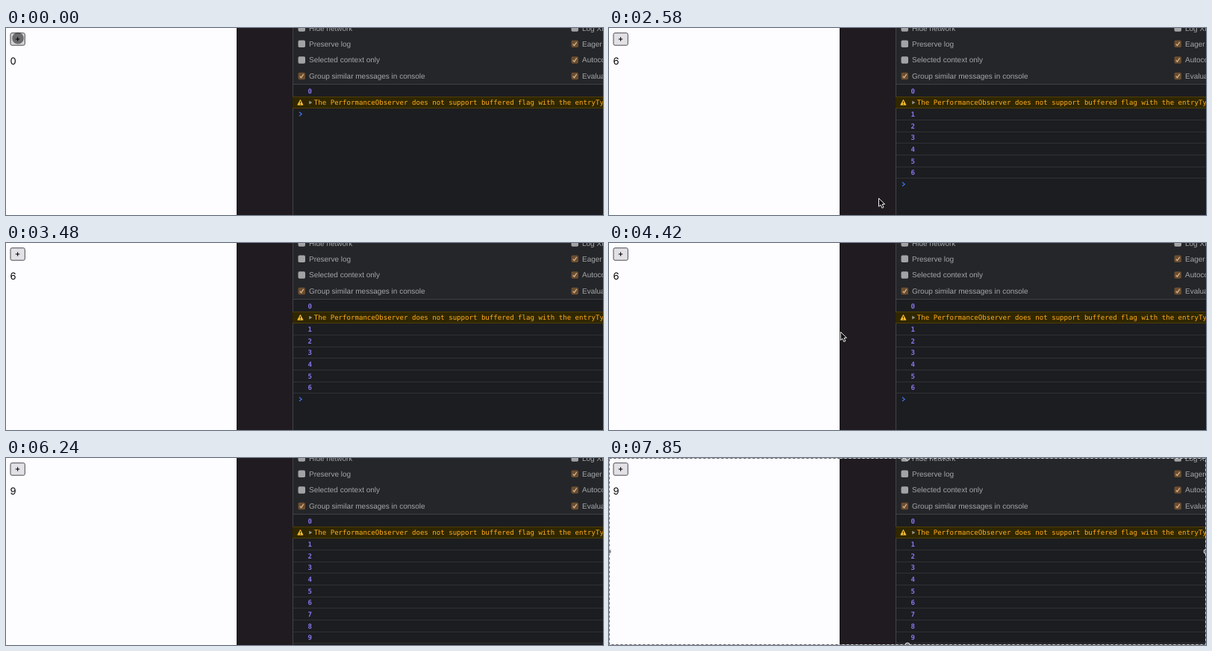
Animation, 800 px wide and 251 px high, one loop 7880 ms. Source, as an HTML page with a canvas:

```html
<!DOCTYPE html>
<html lang="en">
<head>
<meta charset="utf-8">
<style>
  html, body { margin: 0; overflow: hidden; background: #1c1d21; }
  canvas { display: block; }
</style>
</head>
<body>
<canvas id="stage" width="800" height="251"></canvas>
<script>
const ctx = document.getElementById('stage').getContext('2d');
const LOOP = 7880, ROW = 15.68, PAGE_W = 309;
const SANS = '"Liberation Sans", Arial, sans-serif';
const MONO = '"DejaVu Sans Mono", monospace';

// Times at which the counter goes up by one
const countTimes = [850, 1040, 1230, 1900, 2080, 2260, 4950, 5120, 5290];
const clickTimes = [930, 1120, 1310, 3790, 3870, 3950];
const BORDER_AT = 6990;

// Pointer visits: [time, x, y] stops, eased in between
const visits = [
  [[0, 16, 13.7], [1620, 16, 13.7], [2300, 356, 194], [2500, 361, 228], [2620, 361, 228], [2850, 373, 258]],
  [[3500, -10, 150], [3750, 16, 13.7], [4020, 16, 13.7], [4540, 355, 135], [5700, 355, 135]]
];

const options = [
  [391, 0, 'Hide network', false], [391, 21.3, 'Preserve log', false],
  [391, 42.9, 'Selected context only', false], [391, 64.4, 'Group similar messages in console', true],
  [757, 0, 'Log XMLHttpRequests', false], [757, 21.3, 'Eager evaluation', true],
  [757, 42.9, 'Autocomplete from history', true], [757, 64.4, 'Evaluate triggers', true]
];

function rect(x, y, w, h, color) {
  ctx.fillStyle = color;
  ctx.fillRect(x, y, w, h);
}

function text(str, x, y, font, color) {
  ctx.font = font;
  ctx.fillStyle = color;
  ctx.fillText(str, x, y);
}

function path(points, closed) {
  ctx.beginPath();
  points.forEach(([x, y]) => ctx.lineTo(x, y));
  if (closed) ctx.closePath();
}

function stroke(color, width) {
  ctx.strokeStyle = color;
  ctx.lineWidth = width;
  ctx.stroke();
}

function disc(x, y, r, color) {
  ctx.beginPath();
  ctx.arc(x, y, r, 0, 7);
  ctx.fillStyle = color;
  ctx.fill();
}

function box(x, y, w, h, r, color) {
  ctx.beginPath();
  ctx.roundRect(x, y, w, h, r);
  ctx.fillStyle = color;
  ctx.fill();
}

function drawOption([x, y, label, checked]) {
  box(x + .5, y - 4.7, 9.5, 9.5, 1.8, checked ? '#6b4d30' : '#a2a3a5');
  if (checked) {
    path([[x + 2.7, y + .2], [x + 4.5, y + 2.3], [x + 7.8, y - 2.5]]);
    stroke('#d9b78f', 1.2);
  }
  text(label, x + 15, y + 3.5, '10px ' + SANS, '#a4a6aa');
}

function drawPage(count, pressed) {
  rect(0, 0, PAGE_W, 251, '#fdfcff');
  box(6, 6.7, 19.3, 16.5, 2, pressed ? '#d6d4d8' : '#e2e1e5');
  stroke('#4c4b50', 1);
  rect(12.8, 14.4, 5.4, 1.1, '#111');
  rect(15, 12.2, 1.1, 5.4, '#111');
  text(count, 5.6, 48.5, '13px Inter, sans-serif', '#000');
}

function drawWarning() {
  rect(384, 92, 416, 15.5, '#302700');
  rect(384, 92, 416, 1, '#4c3c02');
  rect(384, 107, 416, 1, '#4c3c02');
  path([[394.4, 96.4], [398, 103.2], [390.8, 103.2]], true);
  ctx.fillStyle = '#f3bb35';
  ctx.fill();
  stroke('#f3bb35', .9);
  rect(393.9, 98.4, 1, 2.6, '#2a2200');
  rect(393.9, 101.8, 1, 1, '#2a2200');
  path([[406.2, 97.8], [410.4, 100.1], [406.2, 102.4]], true);
  ctx.fillStyle = '#92928c';
  ctx.fill();
  text('The PerformanceObserver does not support buffered flag with the entryType',
    412.8, 103.2, '9.08px ' + MONO, '#ffab20');
}

function drawConsole(count) {
  rect(PAGE_W, 0, 75, 251, '#1f1b20');
  rect(385, 0, 415, 75, '#242629');
  rect(385, 75, 415, 176, '#1c1d21');
  rect(384, 0, 1, 251, '#424346');
  rect(385, 75, 415, 1, '#404245');
  options.forEach(drawOption);
  drawWarning();
  for (let n = 0; n <= count; n++) {
    const y = 84.2 + ROW * (n && n + 1);
    text(n, 404.6, y + 3.4, 'bold 9.08px ' + MONO, '#8b76ee');
    if (n) rect(385, Math.round(y + 7.3), 415, 1, '#2f3134');
  }
  const y = 84.2 + ROW * (count + 2);
  path([[393, y - 2.7], [396.2, y], [393, y + 2.7]]);
  stroke('#3f70dc', 1.3);
}

function pointerAt(t) {
  const stops = visits.find(v => t >= v[0][0] && t < v.at(-1)[0]);
  if (!stops) return null;
  const i = stops.findIndex(s => s[0] > t);
  const [t0, x0, y0] = stops[i - 1], [t1, x1, y1] = stops[i];
  const u = (t - t0) / (t1 - t0), k = u * u * (3 - 2 * u);
  return [x0 + (x1 - x0) * k, y0 + (y1 - y0) * k];
}

function drawPointer([x, y], pressed) {
  if (x < PAGE_W) return disc(x, y, 7.8, pressed ? 'rgba(0,0,0,.5)' : 'rgba(0,0,0,.45)');
  ctx.save();
  ctx.translate(x, y);
  path([[.5, .5], [.5, 11.7], [3, 9.4], [4.9, 13.6], [7, 12.7], [5.2, 8.6], [8.6, 8.4]], true);
  ctx.fillStyle = '#0c0c0e';
  ctx.fill();
  stroke('#f2f2f2', 1);
  ctx.restore();
}

function drawSelection() {
  ctx.beginPath();
  ctx.rect(.5, .5, 799, 250);
  stroke('#d8d8da', 1);
  ctx.setLineDash([3, 3]);
  stroke('#5c5c5e', 1);
  ctx.setLineDash([]);
  [[0, 125.5], [800, 125.5], [400, 0], [400, 251]].forEach(([x, y]) => {
    disc(x, y, 3, '#77777a');
    stroke('#e4e4e6', 1);
  });
}

function draw(now) {
  const t = now % LOOP;
  const count = countTimes.filter(c => c <= t).length;
  const pressed = t < 820 || clickTimes.some(c => t >= c && t < c + 60);
  drawConsole(count);
  drawPage(count, pressed);
  const pointer = pointerAt(t);
  if (pointer) drawPointer(pointer, pressed);
  if (t >= BORDER_AT) drawSelection();
}

ctx.textRendering = 'geometricPrecision';
const start = performance.now();
(function tick() {
  draw(performance.now() - start);
  requestAnimationFrame(tick);
})();
</script>
</body>
</html>
```
